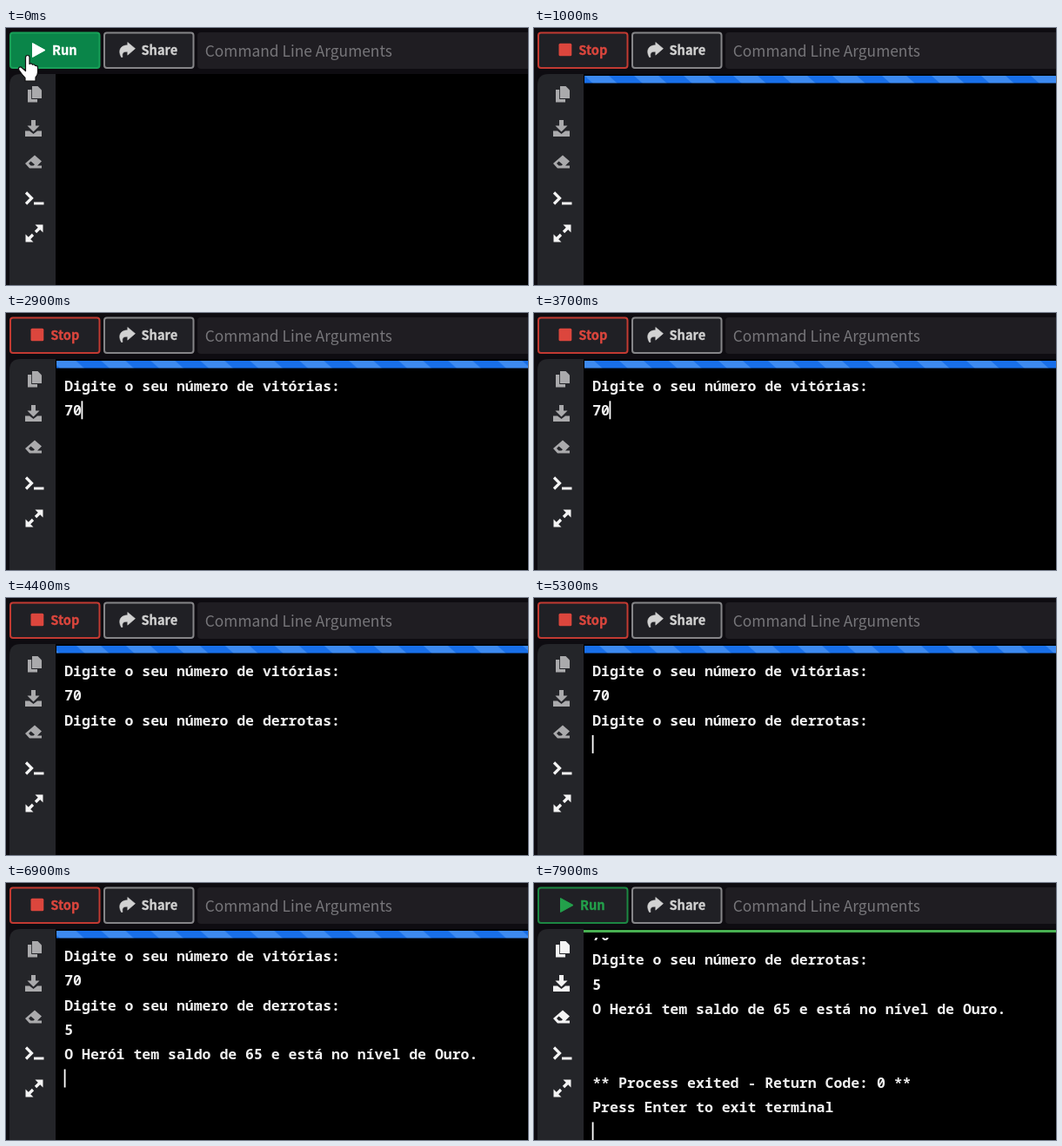
Animation of 600 by 296 pixels, one loop 8000 ms. Source, as an HTML page:

```html
<!DOCTYPE html>
<html lang="en">
<head>
<meta charset="utf-8">
<title>Terminal run</title>
<style>
html, body { margin: 0; width: 100%; height: 100%; overflow: hidden; background: #0e0c11; }
svg { display: block; width: 100vw; height: 100vh; }
.ui { font: 17.35px "Noto Sans CJK JP", "Noto Sans", sans-serif; fill: #77767a; }
.label { font: 900 14.6px "Noto Sans CJK JP", "Noto Sans", sans-serif; stroke-width: .3; }
.term { font: 600 16.5px "Noto Sans Mono", "DejaVu Sans Mono", monospace; fill: #f0f0f0; white-space: pre; }
.button { fill: #202025; stroke-width: 2; }
</style>
</head>
<body>
<svg viewBox="0 0 600 296" preserveAspectRatio="none">
  <defs>
    <clipPath id="screen"><rect x="57" y="63" width="543" height="233"/></clipPath>
    <pattern id="stripes" width="57" height="9" y="55" patternUnits="userSpaceOnUse">
      <rect width="57" height="9" fill="#186fe9"/>
      <path d="M0 0H28L38 9H10Z" fill="#3d8af0"/>
    </pattern>
  </defs>

  <rect width="600" height="296" fill="#0e0c11"/>
  <path d="M600 5H224Q220 5 220 9V43Q220 47 224 47H600Z" fill="#1f1d22"/>
  <text class="ui" x="228.8" y="32.8">Command Line Arguments</text>

  <g id="runButton">
    <rect id="runBox" class="button" x="5" y="5.5" width="102.5" height="40.5" rx="3"/>
    <path id="play" d="M30.500 17.500 45 25.500 30.500 33.500Z" stroke-width="1" stroke-linejoin="round"/>
    <rect id="square" x="28.500" y="17.800" width="14.800" height="14.500" rx="1.500"/>
    <text id="runLabel" class="label" y="31.300"></text>
  </g>
  <g fill="#d2d2d2">
    <rect class="button" x="113" y="5.500" width="102.500" height="40.500" rx="3" stroke="#858588"/>
    <path d="M132.500 33.500C128 25 132.500 19.800 139.800 19.800V16.500L148.500 23.700 139.800 31.200V27.300C135 27 133 28.500 134 33.500Z"
      stroke="#d2d2d2" stroke-width=".6" stroke-linejoin="round"/>
    <text class="label" x="155.500" y="31.300" stroke="#d2d2d2">Share</text>
  </g>

  <path d="M4 296V66Q4 53 17 53H57V296Z" fill="#242529"/>
  <g id="tools">
    <path d="M30 67H36.500L41 71.500V81H30Z"/>
    <path d="M29.200 71H25V85.500H36V82H29.200Z"/>
    <path d="M29 106H34V112.500H38.500L31.500 119.500 24.500 112.500H29Z"/>
    <path d="M22 118.500H27L31.500 122 36 118.500H41V125H22Z"/>
    <path fill-rule="evenodd" d="M33 146.500 41 153.500 36 158.500H41V161.500H27L22 156ZM28.500 153.500 26 156 28.500 158.500H31.500L33 157.300Z"/>
  </g>
  <g fill="none" stroke="#f4f4f4" stroke-width="3.200">
    <path d="M23 189.500 29.500 196 23 202.500M32 202H43.500"/>
    <path d="M26 243 31 238M34 235 39 230"/>
    <path d="M33.500 226.500H42.500V235.500ZM22.500 237.500V246.500H31.500Z" fill="#f4f4f4" stroke="none"/>
  </g>

  <rect x="57" y="53" width="543" height="243"/>
  <rect id="progress" x="58" y="55" width="542" height="8.500" fill="url(#stripes)"/>
  <rect id="done" x="57" y="54" width="543" height="3" fill="#48b052"/>
  <g clip-path="url(#screen)">
    <g id="lines" class="term"></g>
    <rect id="caret" width="1.800" height="21" fill="#fff"/>
  </g>

  <path id="hand" fill="#fff" stroke="#111" stroke-width="1.200" stroke-linejoin="round"
    d="M22.500 34Q22.500 31.500 24.800 31.500T27 34V41.500Q29 39.800 30.500 42.300 32.500 41 33.600 43.500 36.500 42.800 36.500 46V51Q36.500 54 34 57V61H22V57.500Q18.500 54 15 48.500C13.200 45.500 16.500 43.800 18.500 46L22.500 49.500Z"/>
</svg>

<script>
const LOOP = 8000, LINE = 28.3, CHAR = 9.9, LEFT = 67.2;
const START = 400, ENTER = 6600, EXIT = 7000;
const el = id => document.getElementById(id);
const show = (id, on) => el(id).setAttribute("visibility", on ? "visible" : "hidden");
const set = (id, attrs) => {
  for (const name in attrs) el(id).setAttribute(name, attrs[name]);
};

// Each entry: time, terminal row, text printed by then.
const output = [
  [1300, 0, "Digite o seu número de vitórias:"],
  [1300, 1, ""],
  [2300, 1, "7"],
  [2500, 1, "70"],
  [3900, 2, "Digite o seu número de derrotas:"],
  [3900, 3, ""],
  [5700, 3, "5"],
  [ENTER, 4, ""],
  [6800, 4, "O Herói tem saldo de 65 e está no nível de Ouro."],
  [6800, 5, ""],
  [EXIT, 7, "** Process exited - Return Code: 0 **"],
  [EXIT, 8, "Press Enter to exit terminal"],
  [EXIT, 9, ""]
];

const rows = Array.from({ length: 10 }, () => {
  const row = document.createElementNS("http://www.w3.org/2000/svg", "text");
  row.setAttribute("x", LEFT);
  return el("lines").appendChild(row);
});

function drawButton(t) {
  const running = t >= START && t < EXIT;
  const hovered = t < START;
  const color = running ? "#dc463d" : hovered ? "#fff" : "#23a04b";
  set("runButton", { fill: color });
  set("runBox", {
    stroke: running ? "#c23a32" : hovered ? "#18a058" : "#1c8743",
    style: hovered ? "fill:#0a8549" : ""
  });
  set("play", { stroke: color });
  set("runLabel", { stroke: color, x: running ? 51.3 : 53 });
  el("runLabel").textContent = running ? "Stop" : "Run";
  show("play", !running);
  show("square", running);
  show("progress", running);
  show("done", t >= EXIT);
  set("tools", { fill: t >= EXIT ? "#f4f4f4" : "#aaaaac" });
}

function drawTerminal(t) {
  const scroll = t >= EXIT ? 52.3 : 0;
  const text = [];
  let last = 0;
  for (const [time, row, string] of output) {
    if (t >= time) text[last = row] = string;
  }
  rows.forEach((row, i) => {
    row.textContent = text[i] || "";
    row.setAttribute("y", 90 + i * LINE - scroll);
  });
  const blink = (t < ENTER ? t : t - ENTER) % 1200 < 600;
  show("caret", t >= output[0][0] && blink);
  set("caret", {
    x: LEFT - 0.5 + (text[last] || "").length * CHAR,
    y: 73 + last * LINE - scroll
  });
}

function frame(now) {
  const t = now % LOOP;
  drawButton(t);
  drawTerminal(t);
  set("stripes", { x: 58 + t * 0.057 });
  const leave = Math.min(1, Math.max(0, (t - 500) / 350)) ** 2;
  set("hand", { transform: `translate(${-12 * leave} ${-64 * leave})` });
  show("hand", leave < 1);
  requestAnimationFrame(frame);
}
requestAnimationFrame(frame);
</script>
</body>
</html>
```
